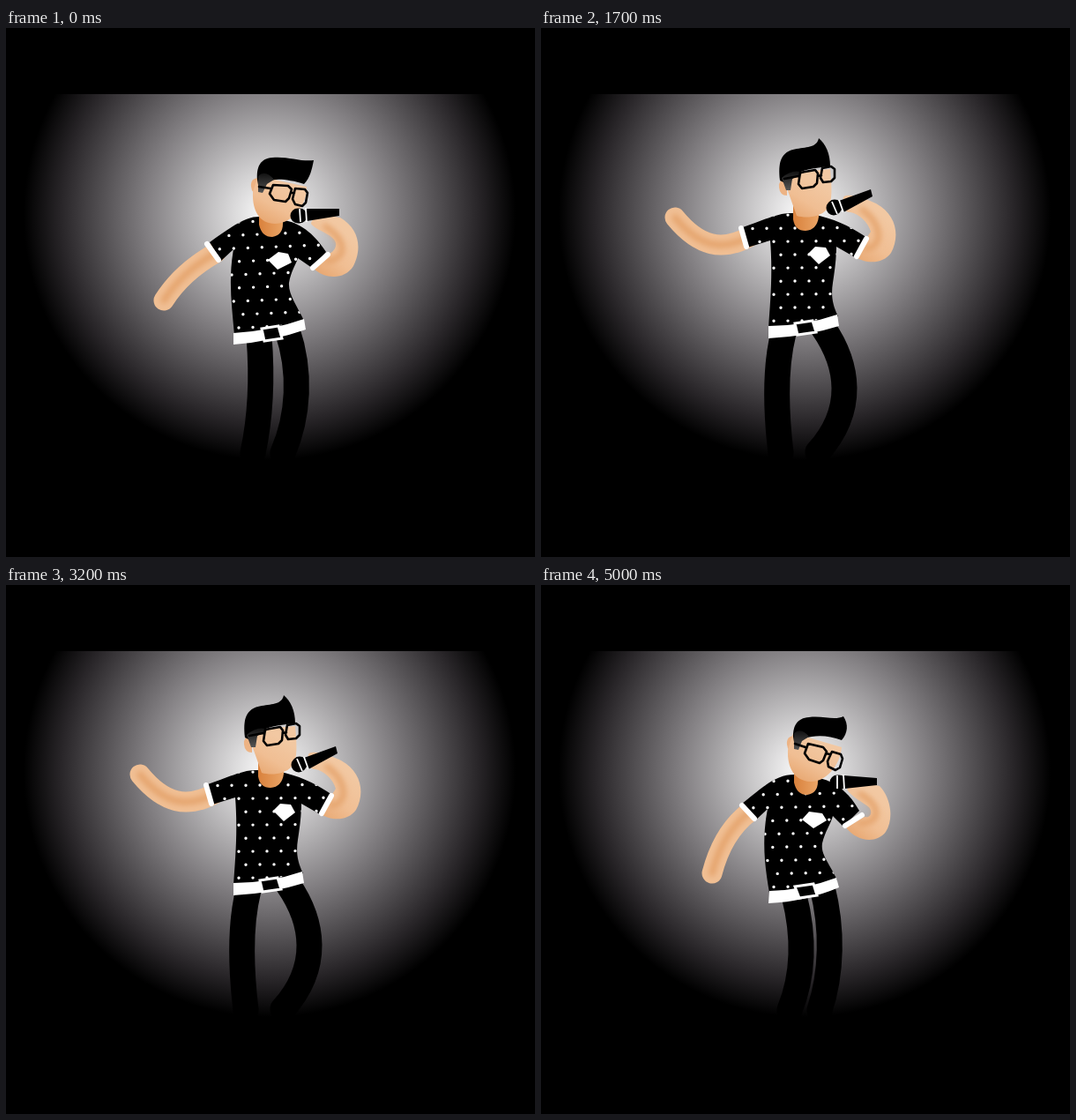
These frames come from a looping animation (600 by 600 pixels, 5.1 s). An HTML page:

```html
<!DOCTYPE html>
<html lang="en">
<head>
<meta charset="utf-8">
<title>Singer</title>
<style>
html, body { margin: 0; width: 100%; height: 100%; overflow: hidden; background: #000; }
svg { display: block; width: 600px; height: 600px; }
path { fill: none; }
.ink { fill: #000; }
.white { fill: #fff; }
.line { stroke: #000; stroke-linejoin: round; stroke-linecap: round; }
.trim { stroke: #fff; }
.shade { stroke: #e4a26a; stroke-linecap: round; filter: url(#soft); }
</style>
</head>
<body>
<svg viewBox="0 0 600 600">
  <defs>
    <radialGradient id="glow" gradientUnits="userSpaceOnUse" cx="299" cy="211" r="279">
      <stop offset="0" stop-color="#fff"/>
      <stop offset=".5" stop-color="#827f82"/>
      <stop offset=".85" stop-color="#282528"/>
      <stop offset="1" stop-color="#000"/>
    </radialGradient>
    <linearGradient id="skin" x1=".1" y1="1" x2=".6" y2=".2">
      <stop offset="0" stop-color="#e6a36b"/>
      <stop offset=".5" stop-color="#f0be93"/>
      <stop offset="1" stop-color="#f2c8a2"/>
    </linearGradient>
    <linearGradient id="neckTone" x1="0" y1="0" x2="1" y2="0">
      <stop offset="0" stop-color="#d9813c"/>
      <stop offset="1" stop-color="#eaa567"/>
    </linearGradient>
    <linearGradient id="fade" x1="0" y1="0" x2="0" y2="1">
      <stop offset="0" stop-color="#111"/>
      <stop offset="1" stop-color="#555"/>
    </linearGradient>
    <filter id="soft" filterUnits="userSpaceOnUse" x="0" y="0" width="600" height="600">
      <feGaussianBlur stdDeviation="3"/>
    </filter>
    <clipPath id="cloth"><path data-part="shirt"/></clipPath>
  </defs>
  <rect width="600" height="600"/>
  <rect y="75" width="600" height="525" fill="url(#glow)"/>

  <g stroke="#000" stroke-linecap="round" stroke-width="29">
    <path data-part="legL"/>
    <path data-part="legR"/>
  </g>

  <path data-part="armL" stroke="#f0bf94" stroke-width="23" stroke-linecap="round"/>
  <path data-part="armL" class="shade" stroke-width="7"/>

  <path data-part="shirt" class="ink"/>
  <path data-part="dots" class="trim" stroke-width="3.4" stroke-linecap="round" clip-path="url(#cloth)"/>
  <path data-part="pocket" class="white"/>
  <path data-part="belt" class="white"/>
  <path data-part="buckle" class="ink trim" stroke-width="3"/>
  <path data-part="armR" style="fill:url(#skin)"/>
  <path data-part="crook" class="shade" stroke-width="6"/>
  <path data-part="cuffs" class="trim" stroke-width="6" stroke-linecap="round"/>

  <path data-part="neck" style="fill:url(#neckTone)"/>
  <path data-part="ear" style="fill:#edb384"/>
  <path data-part="face" style="fill:url(#skin)"/>
  <path data-part="hair" class="ink"/>
  <path data-part="burn" style="fill:url(#fade)"/>
  <path data-part="glasses" class="line" stroke-width="2.6"/>

  <path data-part="mic" class="ink"/>
  <path data-part="ball" class="line" stroke-width="17"/>
  <path data-part="bands" class="trim" stroke-width="1.8"/>
</svg>
<script>
// Polka dots follow the bend of the torso.
function dots(bend, drop, tilt) {
  let d = '';
  for (let row = 0; row < 9; row++) {
    const shift = bend * Math.sin(Math.PI * row / 8);
    for (let col = 0; col < 10; col++) {
      const x = 224 + 16 * col + 8 * (1 - row % 2);
      const y = 212 + 15 * row + drop - tilt * (x - 290);
      d += `M${(x + shift).toFixed(1)} ${y.toFixed(1)}h0`;
    }
  }
  return d;
}

// Each part in three poses: raised, leaning, crouched.
const parts = {
  legL: [
    'M275 346C264 390 267 440 272 482',
    'M287 350C291 400 289 440 280 482',
    'M287 352C298 395 299 440 282 482'],
  legR: [
    'M320 340C349 382 357 433 314 481',
    'M319 343C335 390 332 440 314 482',
    'M319 343C331 390 330 440 316 482'],
  armL: [
    'M236 237C206 253 180 249 152 215',
    'M238 255C215 268 193 287 179 309',
    'M237 257C213 275 201 300 194 327'],
  shirt: [
    'M286 210C270 209 255 217 229 226L234 249L260 241C263 280 260 310 258 341L337 327C330 313 329 302 331 289C333 276 335 262 335 248L356 260L370 238C355 228 340 219 316 213Z',
    'M287 214C275 214 262 220 231 243L244 264L258 251C252 285 256 315 259 348L338 332C330 315 320 302 321 289C323 276 329 268 331 261L347 272L363 254C352 237 337 222 316 218Z',
    'M287 215C268 215 255 226 228 248L242 268L257 254C250 290 254 320 259 349L336 335C327 315 317 306 319 293C322 280 329 270 331 262L343 274L361 256C351 238 337 224 316 219Z'],
  dots: [dots(0, 0, .01), dots(-8, 7, .04), dots(-10, 10, .02)],
  pocket: [
    'M303 256L311 248L323 249L328 258L315 268Z',
    'M297 263L309 254L320 256L324 266L308 274Z',
    'M296 266L304 257L319 259L324 267L309 276Z'],
  belt: [
    'M258 338Q298 338 336 325L338 338Q300 350 258 352Z',
    'M258 346Q298 344 338 330L340 342Q300 356 258 359Z',
    'M259 347Q298 346 335 332L338 343Q300 359 258 361Z'],
  buckle: [
    'M288 335L308 332L312 345L291 348Z',
    'M290 341L309 338L313 352L293 355Z',
    'M288 342L309 339L313 352L293 355Z'],
  armR: [
    'M356 259C368 268 388 268 397 255C407 237 404 212 380 199C368 193 346 186 343 192C341 202 343 209 351 209C361 211 371 220 374 231C375 236 372 240 368 242Z',
    'M349 273C362 285 384 286 394 270C404 250 401 228 379 215C366 212 346 213 346 222C352 230 372 234 374 244C375 250 370 255 366 256Z',
    'M346 275C358 291 380 294 391 280C401 264 396 240 384 228C370 224 350 226 347 232C352 240 366 247 372 252C377 258 373 265 367 263Z'],
  crook: [
    'M368 250C388 250 388 222 364 206',
    'M364 264C388 262 386 240 362 225',
    'M362 270C386 270 386 250 362 237'],
  cuffs: [
    'M227 227L233 248M358 259L369 239',
    'M228 245L241 263M348 272L365 257',
    'M228 250L242 265M345 273L364 261'],
  neck: [
    'M286 200L286 217Q288 230 300 230Q313 229 315 214L315 200Z',
    'M287 205L287 223Q290 237 302 237Q314 235 314 222L314 205Z',
    'M287 205L287 224Q290 238 302 238Q314 236 314 223L314 205Z'],
  ear: [
    'M279 170Q269 171 270 181Q271 190 279 190Z',
    'M287 170Q277 170 278 180Q279 189 287 189Z',
    'M288 171Q278 171 279 181Q280 190 288 190Z'],
  face: [
    'M273 165L328 160C330 180 331 200 324 206C316 215 300 216 290 213C276 209 272 196 272 180Z',
    'M286 168L341 180C341 205 322 222 305 222C288 222 279 208 280 186Z',
    'M286 168L341 184C339 206 322 224 305 223C288 222 279 208 280 187Z'],
  hair: [
    'M271 173C269 153 271 140 290 137C303 135 313 135 315 125C323 132 328 142 328 157C315 158 300 160 290 165L283 174L277 176Z',
    'M285 172C284 158 288 148 302 147C318 145 335 152 349 150C347 160 345 170 338 177C322 172 305 170 299 174L292 178L286 178Z',
    'M286 172C286 160 290 151 304 150C320 148 333 154 343 149C349 158 348 168 341 176C326 170 310 170 299 174L292 178L287 178Z'],
  burn: [
    'M273 170Q285 159 298 164L285 171L283 184L278 184Z',
    'M286 168Q294 160 304 172L296 177L291 187L286 186Z',
    'M287 168Q295 161 304 172L296 177L292 187L287 186Z'],
  glasses: [
    'M294 164L311 161L314 165L313 176L309 180L296 182L292 177ZM319 159L329 157L333 160L333 170L329 174L320 175L317 170ZM292 168L276 171M314 168L318 167',
    'M303 178L320 179L324 183L321 193L317 197L304 195L299 188ZM328 182L339 183L342 187L340 198L336 202L328 200L325 194ZM300 182L287 180M323 187L327 187',
    'M303 180L320 184L324 189L320 199L316 202L304 198L299 191ZM330 189L340 192L342 197L339 207L334 210L326 206L325 200ZM300 184L288 180M323 191L328 192'],
  mic: [
    'M338 196L374 183L376 191L343 209Z',
    'M340 205L378 205L378 213L341 219Z',
    'M343 216L381 219L381 227L344 231Z'],
  ball: ['M332 204L333 203', 'M331 213L333 213', 'M336 224L338 224'],
  bands: [
    'M330 197L336 211M338 195L343 209',
    'M333 205L334 220M340 204L341 220',
    'M336 216L336 231M343 215L344 231']
};

const NUM = /-?\d+(\.\d+)?/g;
const shapes = [...document.querySelectorAll('[data-part]')].map(el => {
  const poses = parts[el.dataset.part];
  return { el, base: poses[0], nums: poses.map(d => d.match(NUM).map(Number)) };
});

// Pose weights for one beat of five steps, and for the closing step.
const beat = [[0, 1, 0], [.85, .15, 0], [1, 0, 0], [.02, .73, .25], [0, -.4, 1.4]];
const close = [0, 0, 1];
const STEP = 100, STEPS = 51;

function pose(w) {
  for (const { el, base, nums: [a, b, c] } of shapes) {
    let i = 0;
    el.setAttribute('d', base.replace(NUM, () => {
      const v = w[0] * a[i] + w[1] * b[i] + w[2] * c[i];
      i++;
      return v.toFixed(2);
    }));
  }
}

let last = -1;
function tick() {
  const step = Math.floor(performance.now() / STEP) % STEPS;
  if (step !== last) {
    last = step;
    pose(step === STEPS - 1 ? close : beat[step % beat.length]);
  }
  requestAnimationFrame(tick);
}
tick();
</script>
</body>
</html>
```
